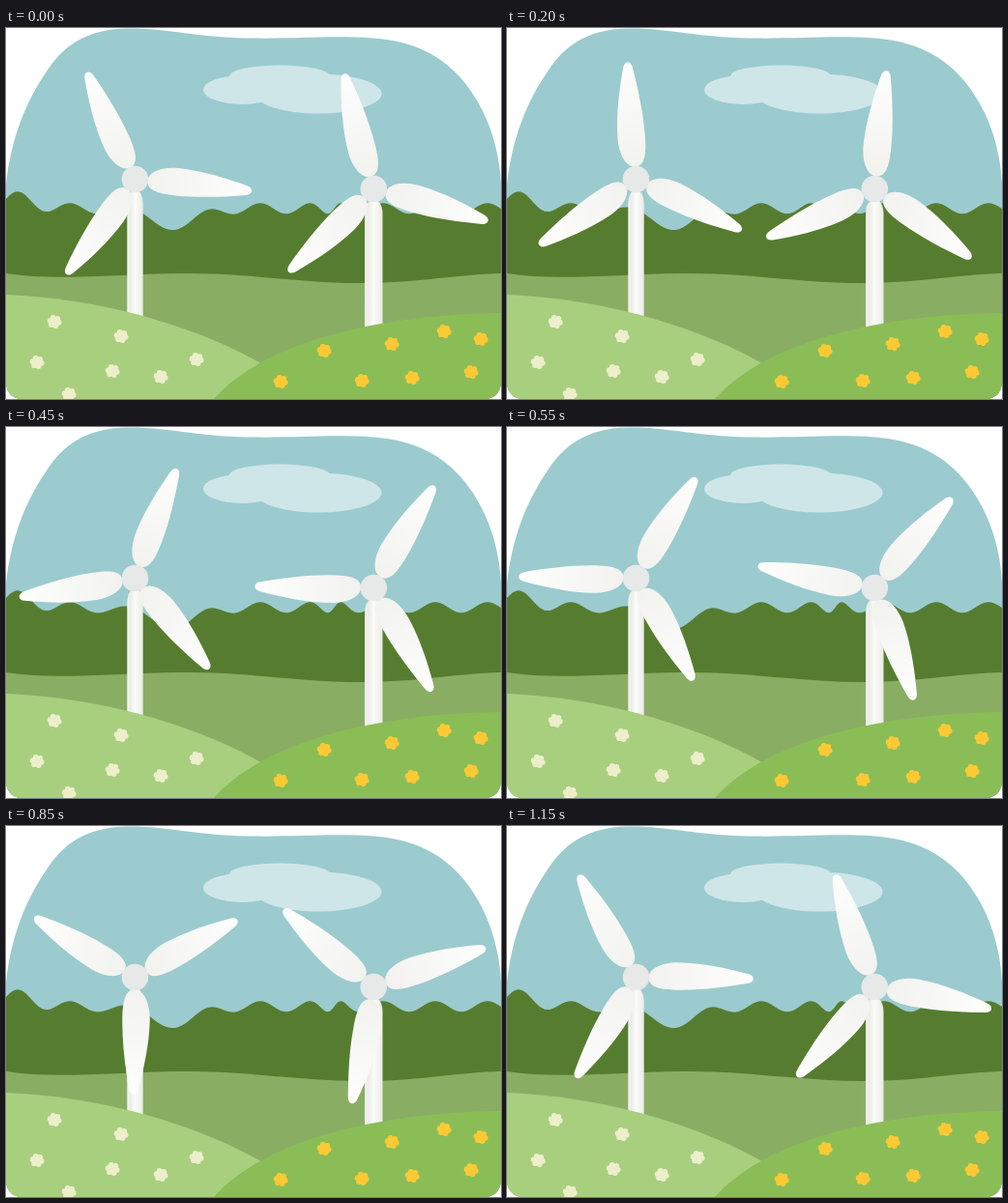
An HTML page that plays this animation: 512 by 384 pixels, repeating every 1.2 s.

```html
<!DOCTYPE html>
<html lang="en">
<head>
<meta charset="utf-8">
<title>Wind turbines</title>
<style>
  html, body { margin: 0; width: 100%; height: 100%; overflow: hidden; background: #fff; }
  svg { display: block; width: 100vw; height: 100vh; }
</style>
</head>
<body>
<svg viewBox="0 0 512 384">
  <defs>
    <clipPath id="scene">
      <path d="M0 162C5 115 20 77 42 45C58 20 82 1 125 .5C168 0 195 9.500 250 10.500C300 11.500 335 7.500 380 10.500C422 13.500 452 29 474 56C498 86 510 122 512 162V369Q510 382 498 384H14Q2 382 0 369Z"/>
    </clipPath>
    <linearGradient id="steel">
      <stop offset="0" stop-color="#f4f4f1"/>
      <stop offset=".2" stop-color="#ecece8"/>
      <stop offset=".5" stop-color="#fbfbf9"/>
      <stop offset="1" stop-color="#ebebe6"/>
    </linearGradient>
    <linearGradient id="sheen" gradientUnits="userSpaceOnUse" x1="0" y1="-14" x2="0" y2="-122">
      <stop offset="0" stop-color="#f2f2ef"/>
      <stop offset="1" stop-color="#fefefd"/>
    </linearGradient>
    <path id="blade" fill="url(#sheen)" d="M0 -13C-9 -13 -15.800 -26 -16 -43C-16 -68 -10.500 -95 -5 -116.500C-3 -123 3 -123 4.500 -116C8.500 -95 12.500 -68 12.500 -44C12.500 -26 10.500 -13 0 -13Z"/>
  </defs>
  <g clip-path="url(#scene)">
    <rect width="512" height="384" fill="#9bcbce"/>
    <g fill="#cfe6e9">
      <ellipse cx="244" cy="64" rx="40" ry="15"/>
      <ellipse cx="283" cy="50" rx="52" ry="11.500"/>
      <ellipse cx="323" cy="68" rx="65.500" ry="20.500"/>
    </g>
    <path id="forest" fill="#567d2f"/>
    <path fill="#8aad64" d="M0 254C50 262 110 255 180 254C250 253 310 265 375 264C430 263 470 255 512 254V384H0Z"/>
    <g id="towers" fill="url(#steel)"></g>
    <path fill="#a8cf7e" d="M0 276C95 280 190 306 262 346L300 384H0Z"/>
    <path fill="#8bbd57" d="M215 384C262 330 370 297 512 295V384Z"/>
    <g id="flowers"></g>
    <g id="rotors"></g>
  </g>
</svg>
<script>
const $ = id => document.getElementById(id);
const LOOP = 1200, STEP = 50;

// 1 at the centre, falling off over the given width; higher powers are flatter
const bump = (v, centre, width, power = 2) => Math.exp(-(Math.abs((v - centre) / width) ** power));

// Tree line: one wave per tree, with a tall first tree and one deep gap
let line = 'M-20 290';
for (let n = -0.5; n < 9.6; n += 0.05) {
  const x = 12 + 54 * n + 35 * bump(n, 4, 1.9, 4);
  const y = 186.7 - 5.5 * Math.cos(2 * Math.PI * n) - 12 * bump(n, 0, 0.4) + 17 * bump(n, 2.55, 0.5);
  line += `L${x} ${y}`;
}
$('forest').setAttribute('d', line + 'V290Z');

function flower(x, y, color) {
  let petals = '';
  for (let i = 0; i < 6; i++) {
    const a = i * Math.PI / 3 + 0.2;
    petals += `<circle cx="${x + 4.6 * Math.cos(a)}" cy="${y + 4.2 * Math.sin(a)}" r="2.9"/>`;
  }
  return `<g fill="${color}"><circle cx="${x}" cy="${y}" r="5"/>${petals}</g>`;
}
const meadow = {
  '#edeecb': '50,304 119,319 32,346 110,355 160,361 197,343 65,379',
  '#fdc934': '284,366 329,334 399,327 453,314 491,322 368,365 420,362 481,356'
};
for (const color in meadow) {
  for (const spot of meadow[color].split(' ')) {
    const [x, y] = spot.split(',').map(Number);
    $('flowers').innerHTML += flower(x + 0.2, y, color);
  }
}

const turbines = [
  { x: 133.5, y: 156.5, half: 8.2, start: -24.1, size: 1 },
  { x: 380.3, y: 166.5, half: 9.2, start: -14.2, size: 1.013 }
];
for (const { x, y, half, size } of turbines) {
  const left = x - half, right = x + half, top = y + 26;
  $('towers').innerHTML += `<path d="M${left} 320V${top}C${left} ${top - 20} ${right} ${top - 20} ${right} ${top}V320Z"/>`;
  const blades = [0, 120, 240].map(a => `<use href="#blade" transform="rotate(${a})"/>`).join('');
  $('rotors').innerHTML += `<g>${blades}</g><circle cx="${x}" cy="${y}" r="13.8" fill="#e7e8e8"/>`;
}
const rotors = $('rotors').querySelectorAll('g');

// A third of a turn per loop brings each blade to its neighbour's place
function draw(now) {
  const time = Math.floor(now % LOOP / STEP) * STEP;
  turbines.forEach(({ x, y, start, size }, i) => rotors[i].setAttribute('transform',
    `translate(${x} ${y}) rotate(${start + 120 * time / LOOP}) scale(${size})`));
}
const begin = performance.now();
function tick() {
  draw(performance.now() - begin);
  requestAnimationFrame(tick);
}
tick();
</script>
</body>
</html>
```
